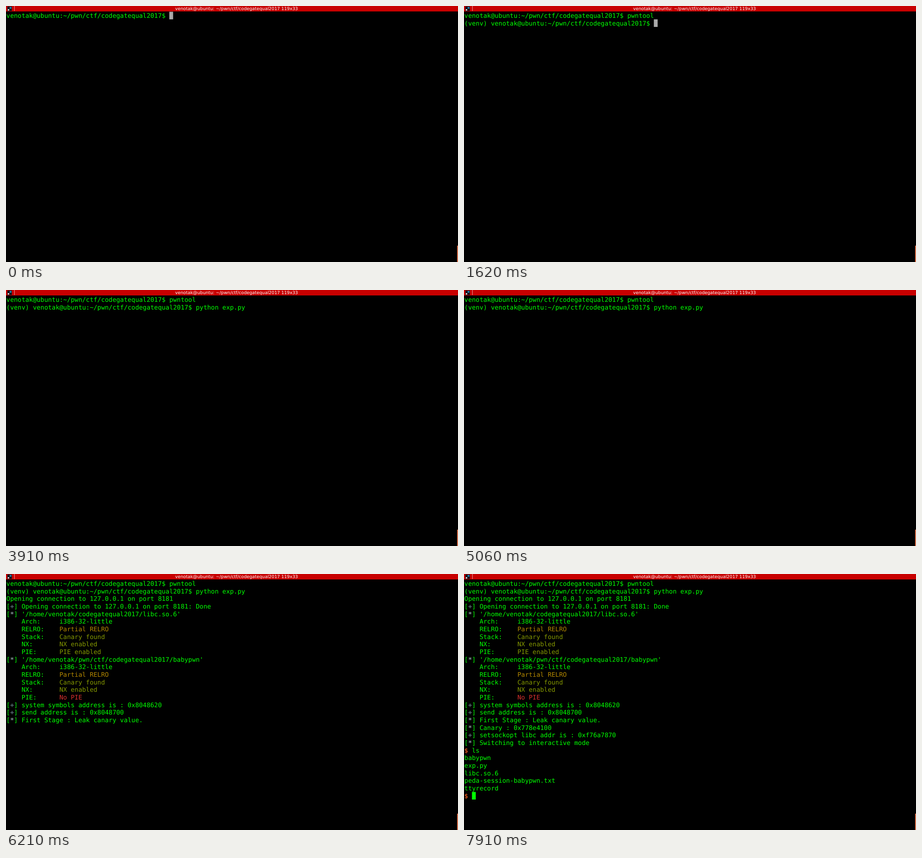
Recreate the animation shown at these times as an HTML page with a canvas. Size 994 by 563 pixels, loop 8000 ms.

```html
<!DOCTYPE html>
<html lang="en">
<head>
<meta charset="utf-8">
<title>Terminal session</title>
<style>
html, body { margin: 0; height: 100%; overflow: hidden; background: #000; }
canvas { display: block; }
</style>
</head>
<body>
<canvas id="stage" width="994" height="563"></canvas>
<script>
const ctx = document.getElementById('stage').getContext('2d');
const LOOP = 8000, CELL_W = 10, CELL_H = 20, SCALE = 5 / 6;
const GREEN = '#00ff00', GREY = '#aaaaaa';
const USER = 'venotak', DIR = 'pwn/ctf/codegatequal2017';
const PROMPT = `${USER}@ubuntu:~/${DIR}$ `;

// "^x" in the text switches the style: colour, bold
const STYLES = {
  n: [GREEN], y: ['#b58900'], g: ['#859900'], r: ['#dc322f'],
  P: ['#586e75', true], S: ['#839496', true], D: ['#cb4b16', true]
};
const plus = s => `[^P+^n] ${s}\n`;
const star = s => `[^S*^n] ${s}\n`;
const connect = 'Opening connection to 127.0.0.1 on port 8181';
const shell = '^D$^n ';
const checksec = (file, pie) => star(`'/home/${USER}/${file}'`) +
  [['Arch:', '^ni386-32-little'], ['RELRO:', '^yPartial RELRO'], ['Stack:', '^gCanary found'],
   ['NX:', '^gNX enabled'], ['PIE:', pie]]
    .map(([key, value]) => `    ${key.padEnd(10)}${value}^n\n`).join('');

// [time, output, cursor colour]; "\r" clears the current line
const EVENTS = [
  [0, PROMPT, GREY],
  [450, 'p', GREY], [570, 'w', GREY], [700, 'n', GREY], [820, 't'],
  [980, 'o'], [1110, 'o'], [1320, 'l', GREY],
  [1600, '\n', GREY], [1620, '(venv) ' + PROMPT, GREY],
  [1890, 'p', GREY], [2090, 'y', GREY], [2270, 't', GREY], [2410, 'h'],
  [2500, 'o'], [2660, 'n', GREY], [2890, ' '],
  [3110, 'e', GREY], [3570, 'x'], [3910, 'p.py'],
  [4290, '\n', GREY], [5060, ''],
  [5120, connect + '\n'],
  [5210, `[^Sx^n] ${connect}`],
  [5320, `\r[^Sx^n] ${connect}: Trying 127.0.0.1`],
  [5420, '\r' + plus(connect + ': Done')],
  [6060, checksec('codegatequal2017/libc.so.6', '^gPIE enabled')],
  [6140, checksec(DIR + '/babypwn', '^rNo PIE')],
  [6210, plus('system symbols address is : 0x8048620') +
    plus('send address is : 0x8048700') + star('First Stage : Leak canary value.')],
  [6300, star('Canary : 0x778e4100')],
  [6390, plus('setsockopt libc addr is : 0xf76a7870')],
  [6470, star('Switching to interactive mode') + shell, GREEN],
  [7360, 'l', GREEN], [7510, 's', GREEN], [7770, '\n'],
  [7840, 'babypwn\nexp.py\nlibc.so.6\npeda-session-babypwn.txt\nttyrecord\n'],
  [7910, shell, GREEN]
];

function box(color, x, y, w, h) {
  ctx.fillStyle = color;
  ctx.fillRect(x, y, w, h);
}

function drawChrome() {
  box('#000', 0, 0, 994, 563);
  box('#c80000', 0, 0, 994, 12);
  box('#14141c', 3, 1, 10, 10);
  box('#1c78a8', 8, 2, 4, 4);
  box('#e8e0e0', 4, 7, 3, 3);
  box('#e8a0a0', 18, 0, 1, 11);
  box('#dd7048', 992, 527, 2, 36);
  ctx.font = '9.66px "DejaVu Sans", sans-serif';
  ctx.textAlign = 'center';
  ctx.fillStyle = '#fff';
  ctx.fillText(`${USER}@ubuntu: ~/${DIR} 119x33`, 507, 9);
}

function drawText(text, cursor) {
  let col = 0, row = 0;
  const setStyle = ([color, bold]) => {
    ctx.fillStyle = color;
    ctx.font = `${bold ? 'bold ' : ''}16.6px "DejaVu Sans Mono", monospace`;
  };
  ctx.textAlign = 'left';
  setStyle(STYLES.n);
  for (let i = 0; i < text.length; i++) {
    if (text[i] === '^') setStyle(STYLES[text[++i]]);
    else if (text[i] === '\n') { row++; col = 0; }
    else ctx.fillText(text[i], col++ * CELL_W, row * CELL_H + 16);
  }
  if (cursor) box(cursor, col * CELL_W, row * CELL_H, CELL_W, CELL_H);
}

function draw(now) {
  const past = EVENTS.filter(([time]) => time <= now % LOOP);
  const text = past.map(e => e[1]).join('').replace(/[^\n]*\r/g, '');
  ctx.textRendering = 'geometricPrecision';
  ctx.setTransform(1, 0, 0, 1, 0, 0);
  drawChrome();
  ctx.setTransform(SCALE, 0, 0, SCALE, 0.833, 12.667);
  drawText(text, past[past.length - 1][2]);
}

const start = performance.now();
function tick() {
  draw(performance.now() - start);
  requestAnimationFrame(tick);
}
tick();
</script>
</body>
</html>
```
